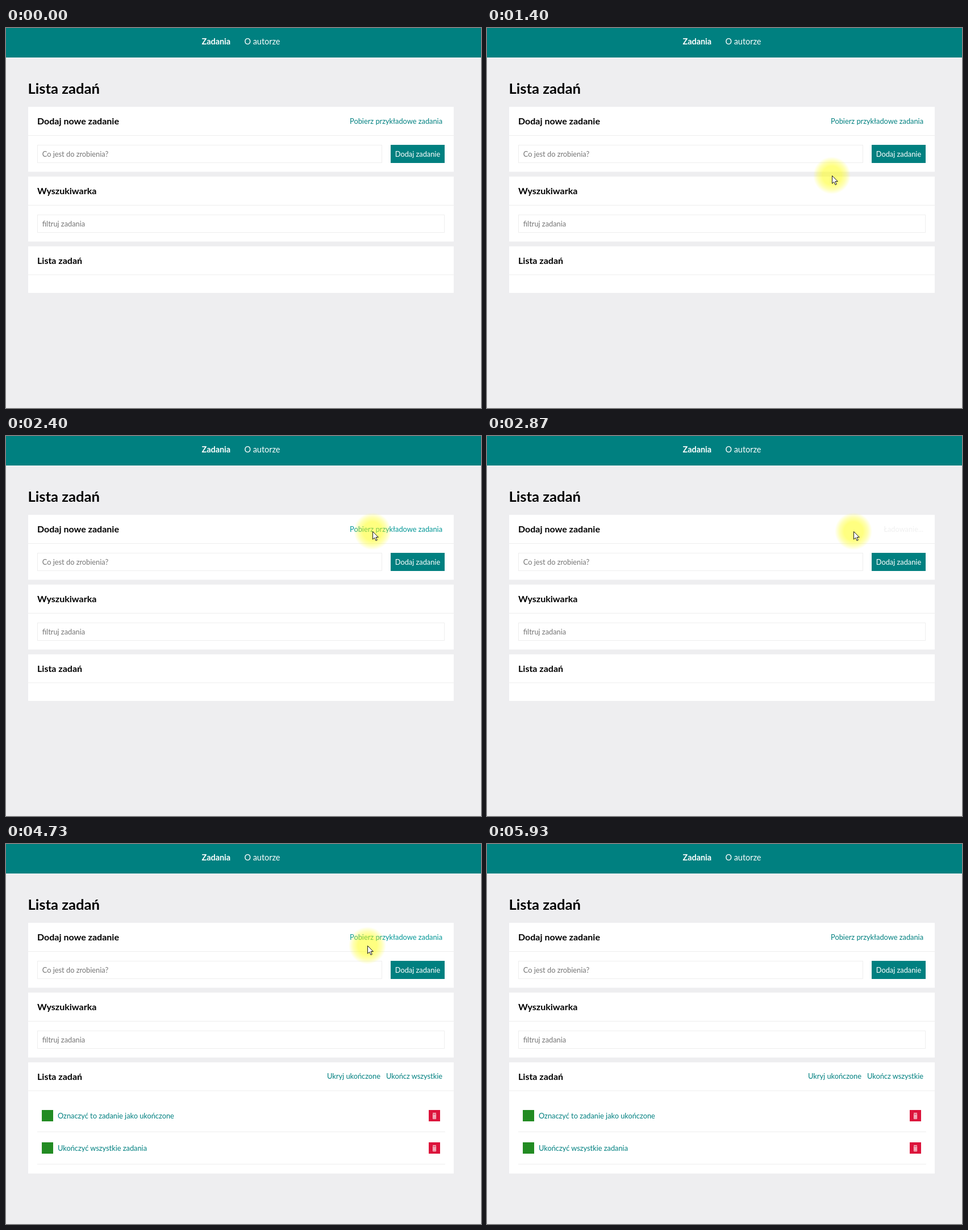
Recreate the animation shown at these times as an HTML page. Size 836 by 670 pixels, loop 5990 ms.

```html
<!DOCTYPE html>
<html lang="pl">
<head>
<meta charset="utf-8">
<style>
  html, body { margin: 0; width: 100%; height: 100%; overflow: hidden; background: #eeeef0; }
  svg { display: block; font: 12.8px Lato, sans-serif; }
  .h1, .h2, .nav { font-weight: 700; }
  .h1 { font-size: 25.6px; }
  .h2 { font-size: 16px; }
  .nav, .nav2 { font-size: 14.4px; fill: #fff; }
  .hint { fill: #757575; }
  .link { fill: teal; }
  .end { text-anchor: end; }
  .card { fill: #fff; }
  .box { fill: #fff; stroke: #eee; }
  .line { fill: #eee; }
</style>
</head>
<body>
<svg width="836" height="670" viewBox="0 0 836 670">
  <defs>
    <radialGradient id="glow">
      <stop offset=".5" stop-color="#ff0" stop-opacity=".5"/>
      <stop offset=".75" stop-color="#ff0" stop-opacity=".3"/>
      <stop offset="1" stop-color="#ff0" stop-opacity="0"/>
    </radialGradient>
    <g id="bin">
      <rect width="20" height="20" fill="#dc143c"/>
      <path d="M7 5.5H13M7.5 7H12.5V15.5H7.5ZM9.2 8V15M10.8 8V15M8 10H12M8 12.5H12" fill="none" stroke="#fff" stroke-width=".8"/>
    </g>
  </defs>

  <rect width="836" height="52" fill="teal"/>
  <text class="nav" x="344.5" y="29">Zadania</text>
  <text class="nav2" x="419.5" y="29">O autorze</text>
  <text class="h1" x="38.5" y="116">Lista zadań</text>

  <rect class="card" x="39" y="139" width="749" height="114.5"/>
  <rect class="line" x="39" y="189" width="749" height="1"/>
  <text class="h2" x="55" y="170">Dodaj nowe zadanie</text>
  <rect class="box" x="55.5" y="206.5" width="606" height="31"/>
  <text class="hint" x="63.8" y="227">Co jest do zrobienia?</text>
  <rect x="677" y="206" width="95" height="32" fill="teal"/>
  <text x="724.5" y="227" fill="#fff" text-anchor="middle">Dodaj zadanie</text>
  <text id="fetch" class="end" x="768" y="169"></text>
  <rect id="focus" x="598.5" y="147.5" width="174" height="33" fill="none" stroke="#101010"/>

  <rect class="card" x="39" y="262" width="749" height="114.5"/>
  <rect class="line" x="39" y="312" width="749" height="1"/>
  <text class="h2" x="55" y="293">Wyszukiwarka</text>
  <rect class="box" x="55.5" y="329.5" width="716" height="31"/>
  <text class="hint" x="63.8" y="350">filtruj zadania</text>

  <rect id="list" class="card" x="39" y="385" width="749" height="82"/>
  <rect class="line" x="39" y="434.5" width="749" height="1"/>
  <text class="h2" x="55" y="416">Lista zadań</text>
  <g id="tasks">
    <text class="link end" x="659" y="414">Ukryj ukończone</text>
    <text class="link end" x="768" y="414">Ukończ wszystkie</text>
    <rect x="63" y="469" width="20" height="20" fill="#228b22"/>
    <text class="link" x="91" y="484">Oznaczyć to zadanie jako ukończone</text>
    <use href="#bin" x="744" y="469"/>
    <rect class="line" x="55" y="507" width="718" height="1"/>
    <rect x="63" y="526" width="20" height="20" fill="#228b22"/>
    <text class="link" x="91" y="541">Ukończyć wszystkie zadania</text>
    <use href="#bin" x="744" y="526"/>
    <rect class="line" x="55" y="564" width="718" height="1"/>
  </g>

  <g id="pointer">
    <circle r="33" fill="url(#glow)"/>
    <path d="M.5 .5V14.2L3.7 11.3L6 16.5L8.2 15.5L6 10.5H10.3Z" fill="#fff" stroke="#000" stroke-width=".9"/>
  </g>
</svg>
<script>
const LOOP = 5990, FPS = 15;
const el = id => document.getElementById(id);
const show = (id, on) => el(id).style.display = on ? '' : 'none';

// Pointer path: [tick, x, y], 15 ticks per second
const path = [
  [11, 394, 655], [13, 445, 500], [14, 478, 420], [15, 505, 363], [17, 562, 312], [19, 592, 290],
  [20, 598, 279], [22, 615, 240], [24, 630, 204], [27, 640, 179], [29, 642, 173], [33, 645, 168],
  [68, 645, 168], [70, 641, 173], [71, 636, 179], [72, 625, 200], [75, 578, 325], [77, 556, 386],
  [78, 553, 400], [85, 553, 400], [86, 595, 397], [88, 808, 386]
];

const TEAL = [0, 128, 128], HOVER = [0, 150, 150], OFF = [240, 240, 240];

// Colour between a and b, easing from tick k0 over n ticks
function fade(a, b, k, k0, n) {
  const u = Math.min(1, Math.max(0, (k - k0) / n));
  const e = u * u * (3 - 2 * u);
  return a.map((v, i) => v + (b[i] - v) * e);
}

function linkColor(k) {
  if (k < 38) return fade(TEAL, HOVER, k, 26, 7);
  if (k < 56) return fade(HOVER, OFF, k, 37, 6);
  if (k < 71) return fade(TEAL, HOVER, k, 56, 7);
  return fade(HOVER, TEAL, k, 71, 7);
}

function draw(now) {
  const k = Math.floor((now % LOOP) * FPS / 1000 + .06);
  const loading = k >= 38 && k < 56, loaded = k >= 56;

  el('fetch').textContent = loading ? 'Ładowanie...' : 'Pobierz przykładowe zadania';
  el('fetch').setAttribute('fill', `rgb(${linkColor(k).map(Math.round)})`);
  show('focus', k === 37);
  show('tasks', loaded);
  el('list').setAttribute('height', loaded ? 196 : 82);

  const visible = k >= 11 && k <= 88;
  show('pointer', visible);
  if (visible) {
    const i = Math.max(1, path.findIndex(p => p[0] >= k));
    const [k0, x0, y0] = path[i - 1], [k1, x1, y1] = path[i];
    const u = (k - k0) / (k1 - k0);
    const x = Math.round(x0 + (x1 - x0) * u), y = Math.round(y0 + (y1 - y0) * u);
    el('pointer').setAttribute('transform', `translate(${x} ${y})`);
  }
}

const start = performance.now();
function tick() {
  draw(performance.now() - start);
  requestAnimationFrame(tick);
}
tick();
</script>
</body>
</html>
```
